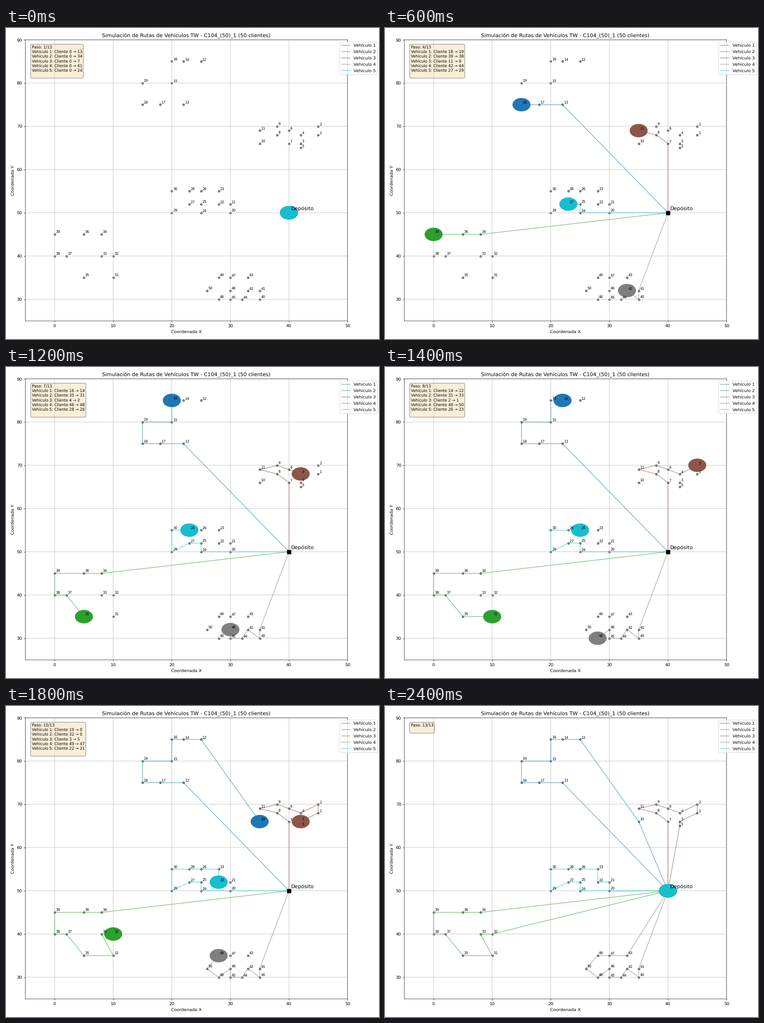
Animation, 820 px wide and 683 px high, one loop 2600 ms. Source, as a matplotlib script:

```python
import math

import matplotlib.pyplot as plt
from matplotlib.animation import FuncAnimation
from matplotlib.patches import Circle

plt.rcParams.update({
    "font.family": "DejaVu Sans",
    "text.hinting": "none",
    "path.snap": False,
    "axes.linewidth": 0.75,
    "grid.linewidth": 0.75,
    "axes.labelpad": 4.4,
})

WIDTH, HEIGHT = 820, 683
DPI = WIDTH / 12
STEPS = 13
STEP_MS = 200
DEPOT = (40, 50)

# Customers stand in columns, {x: heights}, and are numbered in this order.
CLUSTERS = [
    {45: (68, 70), 42: (66, 68, 65), 40: (69, 66), 38: (68, 70), 35: (66, 69)},
    {25: (85,), 22: (75, 85), 20: (80, 85), 18: (75,), 15: (75, 80)},
    {30: (50, 52), 28: (52, 55), 25: (50, 52, 55), 23: (52, 55), 20: (50, 55)},
    {10: (35, 40), 8: (40, 45), 5: (35, 45), 2: (40,), 0: (40, 45)},
    {35: (30, 32), 33: (32, 35), 32: (30,), 30: (30, 32, 35), 28: (30, 35), 26: (32,)},
]
NODES = [DEPOT] + [(x, y) for columns in CLUSTERS
                   for x, heights in columns.items() for y in heights]


def sweep(cx, cy, start, turn):
    """Order nodes by angle around a centre; turn is 1 or -1 (clockwise)."""
    def key(node):
        x, y = NODES[node]
        angle = math.degrees(math.atan2(y - cy, x - cx))
        return (angle - start) * turn % 360
    return key


def out_and_back(node):
    """Go left along the lower side, then return to the right above it."""
    x, y = NODES[node]
    return (0, -x, y) if x <= 25 and y < 53 else (1, x, -y)


def route(customers, order):
    return [0, *sorted(customers, key=order), 0]


VEHICLES = [
    ("tab:blue", route([10, *range(12, 20)], sweep(20.5, 79, -60, -1))),
    ("tab:green", route(range(31, 40), sweep(5, 41, 20, 1))),
    ("tab:brown", route([*range(1, 10), 11], sweep(41, 67.2, -100, -1))),
    ("tab:gray", route(range(40, 51), sweep(31.2, 34.5, 0, -1))),
    ("tab:cyan", route(range(20, 31), out_and_back)),
]

fig, ax = plt.subplots(figsize=(WIDTH / DPI, HEIGHT / DPI), dpi=DPI)
fig.subplots_adjust(left=0.0518, right=0.9157, bottom=0.0583, top=0.962)
ax.set(xlim=(-5, 50), ylim=(25, 90),
       xlabel="Coordenada X", ylabel="Coordenada Y",
       title="Simulación de Rutas de Vehículos TW - C104_(50)_1 (50 clientes)")
ax.grid(True)

ax.scatter(*zip(*NODES[1:]), s=20, c="gray", edgecolors="black",
           linewidths=0.8, alpha=0.8, zorder=1)
for number, (x, y) in enumerate(NODES[1:], 1):
    ax.text(x + 0.2, y + 0.2, str(number), fontsize=8, zorder=4)
ax.scatter(*DEPOT, s=80, c="black", marker="s", zorder=2.5)
ax.text(DEPOT[0] + 0.4, DEPOT[1] + 0.5, "Depósito", fontsize=12, zorder=4)

trails, discs = [], []
for number, (color, _) in enumerate(VEHICLES, 1):
    trails += ax.plot([], [], color=color, alpha=0.6, lw=1.5,
                      label=f"Vehículo {number}")
    discs.append(ax.add_patch(Circle(DEPOT, 1.5, color=color, zorder=3)))

info = ax.text(0.02, 0.98, "", transform=ax.transAxes, fontsize=9, va="top",
               bbox=dict(boxstyle="round", facecolor="wheat", alpha=0.5),
               zorder=4)
ax.legend(loc="upper right", bbox_to_anchor=(1.1, 1), labelspacing=0.54)


def update(step):
    lines = [f"Paso: {step + 1}/{STEPS}"]
    for i, (_, stops) in enumerate(VEHICLES):
        visited = stops[:step + 1]
        trails[i].set_data(*zip(*(NODES[n] for n in visited)))
        discs[i].center = NODES[visited[-1]]
        if step + 1 < len(stops):
            lines.append(f"Vehículo {i + 1}: Cliente {stops[step]} → {stops[step + 1]}")
    info.set_text("\n".join(lines) + "\n")
    return [*trails, *discs, info]


anim = FuncAnimation(fig, update, frames=STEPS, interval=STEP_MS,
                     repeat=True, repeat_delay=0)
plt.show()
```
